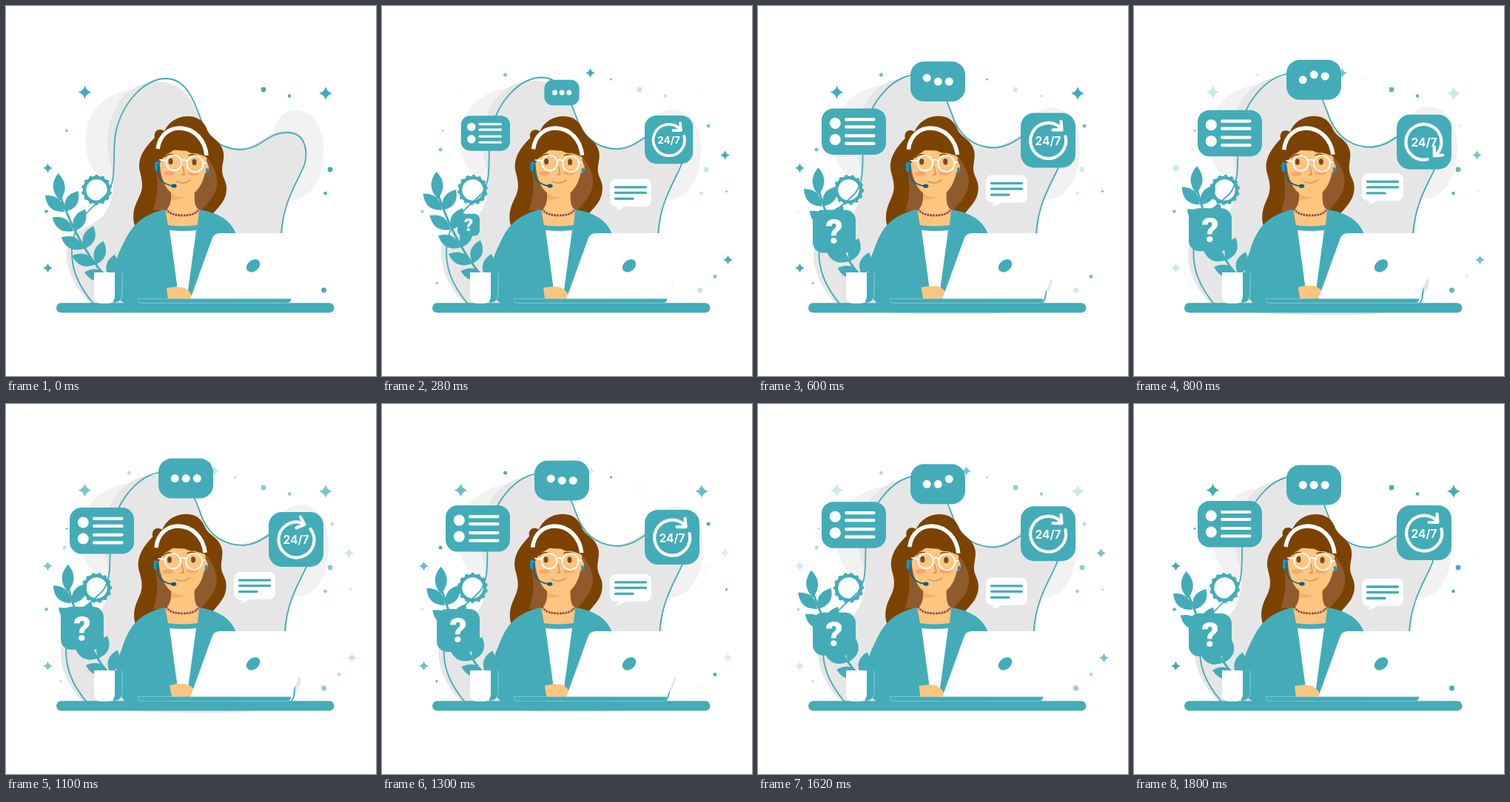
Write an HTML page that moves like this. It is 500 px wide and 500 px high and loops after 1.82 s.

```html
<!DOCTYPE html>
<html lang="en">
<head>
<meta charset="utf-8">
<title>Customer support</title>
<style>
  html, body { margin: 0; width: 100%; height: 100%; overflow: hidden; background: #fff; }
  svg { display: block; width: 100vw; height: 100vh; }
  text { text-anchor: middle; fill: #fff; }
  .teal { fill: #43acb8; }
  .white { fill: #fff; }
  .line { fill: none; stroke-linecap: round; stroke-linejoin: round; }
  .skin { fill: #fec57f; }
  .hair { fill: #7c4300; }
</style>
</head>
<body>
<svg viewBox="0 0 500 500">
  <g id="blob">
    <path fill="#f2f2f2" d="M180 112C140 112 107 140 107 182C107 215 125 235 145 240L200 200Z"/>
    <path fill="#f2f2f2" d="M393 141C378 141 366 150 362 168L380 262C410 265 429 235 429 195C430 165 415 142 393 141Z"/>
    <path fill="#e6e6e6" d="M205 102C245 102 258 140 268 165C285 200 320 200 350 178C375 160 405 165 404 195C403 225 385 245 377 275C371 320 380 352 393 369C391 400 340 413 300 413C220 414 150 412 115 402C95 385 80 355 82 330C86 300 118 300 132 282C148 262 146 235 142 215C138 205 137 195 137 185C138 135 165 103 205 102Z"/>
    <path class="line" stroke="#43acb8" stroke-width="1.8" d="M118 402C95 375 88 352 89 328C92 285 118 273 136 254C151 235 143 205 148 172C157 130 187 98 217 98C248 99 257 138 266 160C279 188 301 194 319 194C346 192 353 171 380 171C403 171 408 192 404 212C398 232 375 260 372 307C371 335 388 355 384 390C382 402 370 406 350 406H125Z"/>
  </g>
  <g id="stars" class="teal"></g>
  <g id="plant" class="teal">
    <path class="line" stroke="#43acb8" stroke-width="2.8" d="M146 378Q100 332 73 256"/>
  </g>
  <g id="gear" class="line" stroke="#43acb8">
    <circle r="16.5" stroke-width="4.600"/>
  </g>
  <rect class="teal" x="68" y="401.300" width="375.500" height="13.200" rx="6.600"/>

  <g id="hair">
    <path class="hair" d="M214 169C206 164 199 169 201 178C192 187 176 203 181 224C185 240 186 247 178 262C171 276 171 287 174 297H262L281 279C289 270 298 262 298 246C298 237 292 231 292 222C292 212 297 203 292 192C287 180 275 178 271 165C265 152 255 149 246 149C232 149 220 156 214 169Z"/>
    <path fill="#8f5b2d" d="M203 220L270 203C279 213 289 231 284 247C280 260 271 268 264 276H198C205 260 206 242 203 220Z"/>
  </g>

  <path class="skin" d="M223 246C224 264 222 272 215 276L219 299H259L262 276C255 272 254 264 255 246Z"/>
  <path fill="#f3b168" d="M223 251Q235 263 249 252Q240 263 223 262Z"/>
  <path class="teal" d="M215 275C194 279 176 290 167 306C160 318 156 330 155 342L160 402H310V306C302 287 284 279 261 275L259 296Q239 299 218 296Z"/>
  <path class="white" d="M221 303Q239 305 257 303L246 384H232Z"/>
  <path class="line" stroke="#9a5058" stroke-width="3.300" stroke-dasharray="0 3.800" d="M217 275Q222 283 239 283Q256 283 260 275"/>
  <g id="arm">
    <path class="teal" d="M198 284C179 287 168 302 160 318C150 337 146 350 146 366C146 390 152 403 170 403H219L220 340Z"/>
    <path class="skin" d="M217 381Q232 378 241 381Q251 386 252 397H219Z"/>
  </g>

  <g id="head">
    <path class="skin" d="M208 193C205 226 214 258 239 258C261 258 273 230 271 198Z"/>
    <ellipse class="skin" cx="270" cy="219" rx="4" ry="7"/>
    <path class="hair" d="M204 208C201 180 218 162 238 163C260 164 275 183 272 205Q264 201 256 199Q249 200 243 195Q231 190 222 198Q213 201 208 212Z"/>
    <path class="line" stroke="#fff" stroke-width="5.500" style="stroke-linecap:butt" d="M205 193C208 172 223 164.500 236 165C255 166 269 181 271 202"/>
    <g fill="#fba46d">
      <ellipse cx="220" cy="226" rx="7.500" ry="3"/><ellipse cx="253" cy="226" rx="8" ry="3"/>
    </g>
    <g class="line" stroke="#7c4300" stroke-width="1.500">
      <path d="M214 204Q219 199 226 201"/><path d="M247 202Q254 199 261 204"/>
    </g>
    <g fill="#7b4824">
      <ellipse cx="222.500" cy="210" rx="3" ry="4.200"/><ellipse cx="254.500" cy="211" rx="3" ry="4.200"/>
    </g>
    <g class="line" stroke="#d18a48" stroke-width="1.300">
      <path d="M239 217L241 228L237 228"/>
      <path d="M230 237Q241 242 249 235"/>
    </g>
    <g class="line" stroke="#fff" stroke-width="1.900">
      <circle cx="227" cy="212" r="10.300"/><circle cx="255.500" cy="213.500" r="11"/>
      <path d="M237 209Q241 206 245 210M217 209L208 208M266 212L271 212"/>
    </g>
    <rect x="201" y="210" width="6.500" height="13" rx="3" fill="#1297c9"/>
    <rect x="270" y="219" width="3.500" height="8" rx="1.700" fill="#1297c9"/>
    <circle cx="271" cy="227" r="1.700" fill="#9a5058"/>
    <path class="line" stroke="#0b6377" stroke-width="1.700" d="M206 214V226Q208 240 225 243"/>
    <ellipse cx="227" cy="243" rx="3.700" ry="2.600" fill="#0b6377"/>
  </g>

  <path class="white" d="M289 307H419L385 396H249L279 313Q282 307 289 307Z"/>
  <ellipse class="teal" cx="334" cy="351" rx="10.300" ry="7.500" transform="rotate(-40 334 351)"/>
  <path class="teal" stroke="#cdeaec" stroke-width=".4" d="M178 395.500H385.500Q385 401.500 380 401.500H184Q178 401.500 178 395.500Z"/>
  <path class="teal" d="M147 360H157V388Q157 401 145 401Z"/>
  <path class="line" stroke="#a9d9de" stroke-width=".7" d="M157 360V388Q157 399 149 401"/>
  <path class="white" d="M119 360H147V391Q147 402 137 402H129Q119 402 119 391Z"/>

  <g id="bubble">
    <path class="white" d="M314 268H334Q326 277 317 278Q320 274 314 268Z"/>
    <rect class="white" x="308" y="236" width="56" height="37" rx="8"/>
    <path class="line" stroke="#43acb8" stroke-width="3.300" d="M315.500 247H356.500M315.500 254.500H356.500M315.500 262.500H339"/>
  </g>
  <g id="clock">
    <rect class="teal" x="355" y="137" width="74" height="74" rx="18"/>
    <g id="arrow" class="line" stroke="#fff" stroke-width="4.200">
      <path d="M415.500 169A24 24 0 1 1 409 157.500"/>
      <path d="M409.500 148.500L410.500 160L398.500 160"/>
    </g>
    <text x="392" y="180.500" font-family="Inter, 'Open Sans', sans-serif" font-weight="700" font-size="15.500">24/7</text>
  </g>
  <g id="list">
    <rect class="teal" x="86" y="131" width="87" height="62.500" rx="16"/>
    <circle class="white" cx="104.300" cy="151" r="7.500"/><circle class="white" cx="104.300" cy="173" r="7.500"/>
    <path class="line" stroke="#fff" stroke-width="4.200" d="M119 146H156.500M119 156H156.500M119 168H156.500M119 178.500H156.500"/>
  </g>
  <g id="dots">
    <rect class="teal" x="206" y="82.500" width="74" height="54" rx="18"/>
  </g>
  <g id="help">
    <rect class="teal" x="74" y="283" width="58" height="58" rx="14"/>
    <text x="103" y="328.500" font-family="Roboto, sans-serif" font-weight="900" font-size="46">?</text>
  </g>
</svg>
<script>
const LOOP = 1820, TAU = Math.PI * 2;
const $ = id => document.getElementById(id);
const clamp = v => Math.min(1, Math.max(0, v));
const wave = (t, period) => (1 + Math.cos(TAU * t / period)) / 2;
const move = (el, value) => el.setAttribute('transform', value);

function add(parent, tag, attrs) {
  const el = document.createElementNS('http://www.w3.org/2000/svg', tag);
  for (const key in attrs) el.setAttribute(key, attrs[key]);
  return parent.appendChild(el);
}

function addLeaf(x, y, angle, length) {
  add($('plant'), 'path', {
    d: `M0 0Q${length / 2} 16 ${length} 0Q${length / 2} -16 0 0Z`,
    transform: `translate(${x} ${y}) rotate(${angle})`
  });
}

// Leaf pairs spread along a curved stem, opening wider towards the pot
const bend = (a, b, c, p) => (1 - p) ** 2 * a + 2 * p * (1 - p) * b + p * p * c;
addLeaf(73, 263, -94, 37);
for (let i = 0; i < 5; i++) {
  const x = bend(79, 101, 139, i / 4), y = bend(278, 333, 368, i / 4);
  addLeaf(x, y, 220 - 6.5 * i, 34);
  addLeaf(x + 1, y, -58 - 5 * i, 33);
}

const TEETH = 14;
for (let i = 0; i < TEETH; i++) {
  add($('gear'), 'path', {
    d: 'M0 -18V-20.5', 'stroke-width': 4, style: 'stroke-linecap: butt',
    transform: `rotate(${i * 360 / TEETH})`
  });
}

function addSpark(parent, x, y, r) {
  const k = r * 0.2;
  add(parent, 'path', {
    d: `M0 ${-r}Q${k} ${-k} ${r} 0Q${k} ${k} 0 ${r}Q${-k} ${k} ${-r} 0Q${-k} ${-k} 0 ${-r}Z`,
    transform: `translate(${x} ${y})`
  });
}
const addDot = (parent, x, y, r) => add(parent, 'circle', { cx: x, cy: y, r });

// Each group fades as one; its members alternate between two sizes
function twinkle(shape, sizes, fade, points) {
  const el = add($('stars'), 'g', {});
  points.forEach(([x, y], i) => shape(el, x, y, sizes[i % 2]));
  return { el, fade };
}
const quick = t => wave(t, LOOP / 3), slow = t => wave(t, LOOP / 2);
const twinkles = [
  twinkle(addSpark, [9, 6.5], quick, [[106.5, 116.5], [56.5, 219], [432, 118], [56.5, 354]]),
  twinkle(addSpark, [6.5, 6.5], t => 1 - quick(t), [[281.5, 90.5], [463.5, 201.5], [467.5, 343]]),
  twinkle(addDot, [3.4, 2.3], slow, [[348, 113], [383, 121.5], [438, 221], [431.5, 253], [429.5, 384]]),
  twinkle(addDot, [2.2, 1.4], t => slow(t - 60), [[54.5, 277.5], [82, 168.5]]),
  twinkle(addDot, [2.5, 1.6], t => 1 - slow(t),
    [[166.5, 93], [309.5, 99], [441, 162], [465.5, 250.5], [450, 365.5], [74, 374.5], [79, 194]])
];

// Cards pop in one after another from an anchor, then drift up or down
const POP = 280, STAGGER = 34;
const cards = [
  { id: 'bubble', x: 308, y: 273, drift: -10 },
  { id: 'clock', x: 355, y: 211, drift: 10 },
  { id: 'list', x: 173, y: 193.5, drift: 10 },
  { id: 'dots', x: 243, y: 136.5, drift: -10 },
  { id: 'help', x: 132, y: 283, drift: -10 }
];

const balls = [-1, 0, 1].map(i => add($('dots'), 'circle', { cx: 243.2 + 15 * i, r: 5.5, fill: '#fff' }));
const hop = (t, start) => 9.5 * (1 - wave(clamp((t - start) / 240), 1));

function draw(t) {
  const sway = 1 - wave(t, LOOP);
  move($('blob'), `translate(265 287) scale(${1 + 0.05 * sway} ${1 + 0.036 * sway}) translate(-265 -287)`);
  move($('plant'), `rotate(${5.5 * sway} 185 378)`);
  move($('gear'), `translate(122.5 248.5) rotate(${360 * t / LOOP})`);
  for (const id of ['hair', 'head']) move($(id), `rotate(${-2.2 * sway} 237 255)`);
  move($('arm'), `rotate(${-3 * sway} 200 290)`);

  for (const { el, fade } of twinkles) el.setAttribute('opacity', fade(t).toFixed(3));

  cards.forEach(({ id, x, y, drift }, i) => {
    const size = clamp((t - STAGGER * i) / POP);
    move($(id), `translate(${x} ${y + drift * sway}) scale(${size}) translate(${-x} ${-y})`);
  });

  const turn = 1 - wave(clamp((t - 600) / 600), 2);
  move($('arrow'), `rotate(${360 * turn} 392 174)`);
  balls.forEach((ball, i) => {
    const start = 540 + 100 * i;
    ball.setAttribute('cy', 109.5 - hop(t, start) - hop(t, start + 720));
  });
}

const begin = performance.now();
function tick() {
  draw((performance.now() - begin) % LOOP);
  requestAnimationFrame(tick);
}
draw(0);
requestAnimationFrame(tick);
</script>
</body>
</html>
```
